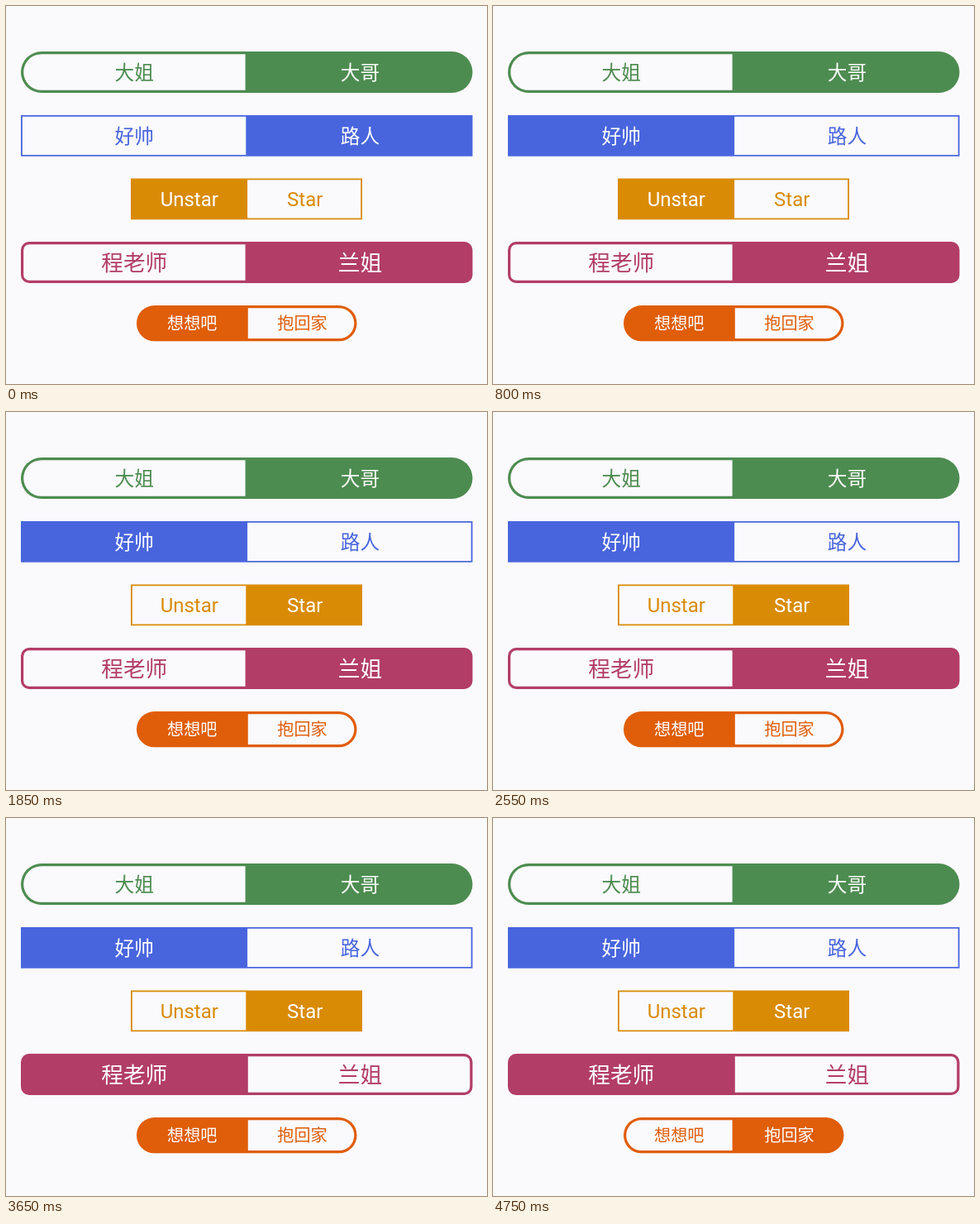
Write an HTML page that moves like this. It is 582 px wide and 457 px high and loops after 4800 ms.

```html
<!DOCTYPE html>
<html lang="zh-CN">
<head>
<meta charset="utf-8">
<title>Segmented switches</title>
<style>
html, body { margin: 0; width: 100%; height: 100%; overflow: hidden; background: #faf9fc; }
svg { display: block; }
text { font-family: Roboto, "Noto Sans CJK SC", "Noto Sans CJK", sans-serif; text-anchor: middle; }
</style>
</head>
<body>
<svg id="stage" width="582" height="457" viewBox="0 0 582 457"></svg>
<script>
const LOOP = 4800, BG = '#faf9fc', MID = 291.2;

// side: 0 = left half, 1 = right half; at: time of the tap
const switches = [
  { x: 18, y: 55, w: 546.5, h: 50, r: 25, line: 3.2, color: '#4d8c50', size: 23.7, base: 89, labels: ['大姐', '大哥'], side: 1, at: Infinity },
  { x: 18, y: 132, w: 546.5, h: 49.7, r: 0, line: 1.8, color: '#4865de', size: 23.7, base: 166, labels: ['好帅', '路人'], side: 1, at: 800 },
  { x: 151, y: 208.5, w: 280, h: 49.7, r: 0, line: 1.8, color: '#d98b06', size: 24, base: 242.3, labels: ['Unstar', 'Star'], side: 0, at: 1850 },
  { x: 18, y: 285, w: 546.5, h: 50, r: 10, line: 3.2, color: '#b23d67', size: 26.7, base: 320.3, labels: ['程老师', '兰姐'], side: 1, at: 2950 },
  { x: 158, y: 362, w: 266.5, h: 43.3, r: 21.6, line: 3.2, color: '#e05d09', size: 20.1, base: 390.7, labels: ['想想吧', '抱回家'], side: 0, at: 4050 }
];

const stage = document.getElementById('stage');

function add(tag, attrs, text = '') {
  const el = document.createElementNS('http://www.w3.org/2000/svg', tag);
  for (const key in attrs) el.setAttribute(key, attrs[key]);
  el.textContent = text;
  return stage.appendChild(el);
}

// Empty inside of one half, rounded at its outer corners
function insidePath({ x, y, w, h, r, line }, side) {
  const dir = side ? 1 : -1;
  const inner = MID + dir * line / 2;
  const outer = side ? x + w - line : x + line;
  const top = y + line, bottom = y + h - line;
  const c = Math.max(0, r - line);
  const arc = `A${c} ${c} 0 0 ${side} `;
  return `M${inner} ${top}H${outer - dir * c}${arc}${outer} ${top + c}` +
    `V${bottom - c}${arc}${outer - dir * c} ${bottom}H${inner}Z`;
}

for (const s of switches) {
  add('rect', { x: s.x, y: s.y, width: s.w, height: s.h, rx: s.r, fill: s.color });
  s.halves = [0, 1].map(side => ({
    inside: add('path', { d: insidePath(s, side), fill: BG }),
    label: add('text', {
      x: (292.5 + s.x + side * s.w) / 2, y: s.base, 'font-size': s.size
    }, s.labels[side])
  }));
}

function draw() {
  const t = performance.now() % LOOP;
  for (const s of switches) {
    const chosen = t < s.at ? s.side : 1 - s.side;
    s.halves.forEach(({ inside, label }, side) => {
      const on = side === chosen;
      inside.setAttribute('visibility', on ? 'hidden' : 'visible');
      label.setAttribute('fill', on ? '#fff' : s.color);
    });
  }
  requestAnimationFrame(draw);
}
draw();
</script>
</body>
</html>
```
